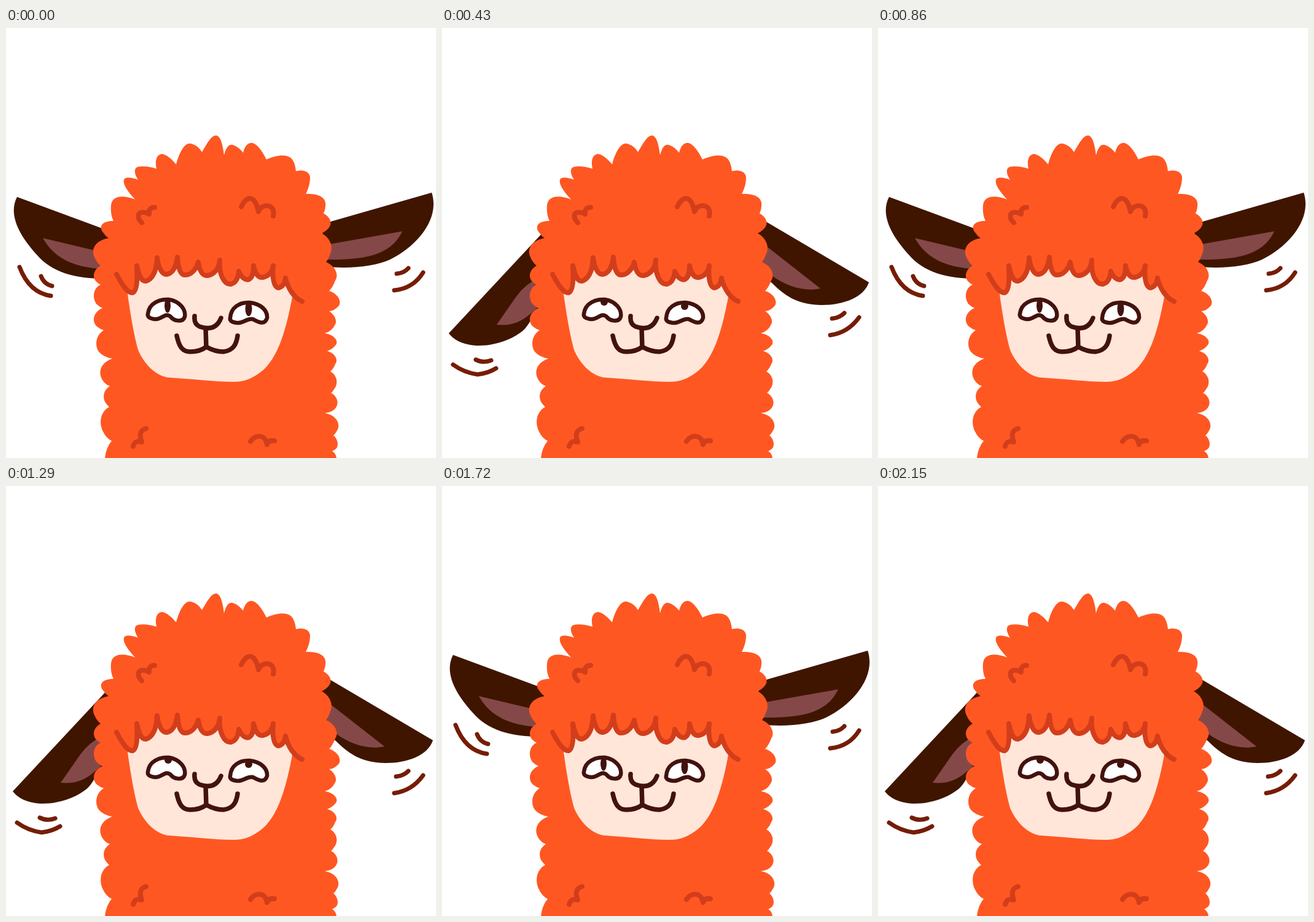
Recreate the animation shown at these times as an HTML page. Size 700 px wide and 700 px high, loop 2.58 s.

```html
<!DOCTYPE html>
<html lang="en">
<head>
<meta charset="utf-8">
<title>Alpaca flapping its ears</title>
<style>
  html, body { margin: 0; width: 100%; height: 100%; overflow: hidden; background: #fff; }
  svg { display: block; width: 100%; height: 100%; }
  .ear { fill: #401500; }
  .inner { fill: #854849; }
  .wool { fill: #ff5722; }
  .line { fill: none; stroke-linecap: round; stroke-linejoin: round; }
  .swish { stroke: #751d05; stroke-width: 7; }
  .curl { stroke: #d23e1b; stroke-width: 8; }
  .ink { stroke: #43120f; stroke-width: 7.5; }
  .eye { fill: #fff; stroke: #43120f; stroke-width: 6.5; stroke-linejoin: round; }
  .pupil { fill: #43120f; }
</style>
</head>
<body>
<svg viewBox="0 0 700 700">
  <g class="up">
    <path class="ear" d="M18 275L175 333V408H150C110 406 75 398 50 369C22 338 3 304 18 275Z
      M693 268L515 319V388C560 393 600 388 625 377C670 355 707 310 693 268Z"/>
    <path class="inner" d="M60 342L165 367V392H152C115 389 80 378 60 342Z
      M645 331L515 354V377H526C580 377 626 372 645 331Z"/>
    <path class="line swish" d="M22 389C30 410 45 432 73 436M57 404Q62 417 75 420
      M632 427Q663 424 679 398M636 400Q648 399 655 391"/>
  </g>
  <g class="down">
    <path class="ear" d="M11 497L180 316V445L153 460C145 475 138 490 126 497C95 519 35 528 11 497Z
      M695 414L500 299V385L537 415C562 440 582 450 618 451C655 451 687 438 695 414Z"/>
    <path class="inner" d="M89 483L121 437Q136 416 160 406V450C137 474 120 486 89 483Z
      M616 424L515 345V380L537 403C560 420 590 430 616 424Z"/>
    <path class="line swish" d="M18 548Q36 561 58 564Q75 562 88 554M55 540Q67 546 80 541
      M632 500Q661 496 679 471M635 473Q647 472 655 464"/>
  </g>

  <!-- Fleece: crown, left side, right side -->
  <path class="wool" d="M210 279C200 268 190 256 192 247C194 242 204 243 215 247
    C208 236 208 228 215 226C223 224 235 226 245 229C242 216 245 206 254 205
    C262 206 270 214 277 222C282 203 290 188 299 188C308 189 315 195 319 202
    C328 187 334 175 342 175C350 176 353 192 355 207C358 196 361 190 368 190
    C376 192 381 197 386 203C389 192 393 187 400 187C409 188 418 202 424 214
    C440 207 454 205 463 211C469 216 471 224 472 233C485 230 494 234 495 243
    C495 254 492 262 488 270L480 320H220Z"/>
  <path class="wool" d="M210 279C190 271 172 273 171 289C170 300 172 308 175 314
    C153 314 151 326 159 334Q162 339 167 342C144 346 138 362 144 373Q147 381 154 387
    C143 393 140 404 146 412Q150 416 154 418C142 423 140 439 147 449Q152 454 157 456
    C142 462 139 478 148 486Q153 490 159 492C146 500 144 517 151 527Q159 536 173 538
    C152 546 150 562 157 573Q161 580 169 583C158 590 157 602 162 610Q165 614 168 617
    C153 625 151 644 158 657Q163 668 172 672Q163 683 161 700H350V279Z"/>
  <path class="wool" d="M488 270C505 269 519 274 520 285Q521 293 517 302
    C527 307 531 316 527 323Q523 330 514 334C528 342 533 356 528 367Q525 376 521 381
    C537 388 542 402 536 411Q532 422 526 428C542 433 547 447 541 453Q535 460 526 461
    C533 465 541 476 535 484Q531 493 519 497C534 499 543 510 536 517Q531 523 523 526
    C537 530 541 541 536 547Q533 555 528 559C540 566 541 580 534 588Q532 592 529 594
    C540 600 542 611 537 618Q533 625 519 627C539 630 545 646 539 655Q536 661 533 663
    C542 671 541 682 537 685Q535 687 531 689Q537 692 538 700H340V270Z"/>

  <path fill="#ffe6d9" d="M197 425C200 450 208 500 215 524C225 548 245 567 265 569
    C300 571 340 576 370 576C390 576 400 570 412 562C445 540 458 480 466 438L460 380H200Z"/>
  <path id="fringe" class="wool" d="M180 401C190 420 198 431 206 431C214 428 214 405 213 387
    C217 405 221 413 228 412C240 408 245 395 246 374C248 390 254 402 262 401
    C272 399 277 388 279 373C280 390 284 403 292 402C302 402 310 392 313 381
    C315 395 320 404 328 403C340 401 347 390 348 378C346 400 355 418 366 417
    C374 415 378 407 379 396C384 408 391 411 396 409C402 405 403 397 403 387
    C406 400 411 407 418 406C428 404 434 396 435 387C433 405 436 423 444 423
    C451 421 454 415 455 407C459 425 470 440 482 445"/>
  <path id="fringeLine" class="line curl"/>
  <path class="line curl" d="M221 317C213 309 214 300 222 300Q229 300 233 303C232 295 236 292 242 292
    M383 291C390 275 405 268 411 299C415 285 440 285 435 306
    M207 681Q210 670 221 674Q214 656 228 652
    M398 673C405 662 422 660 425 678Q428 670 437 672"/>

  <path class="eye" d="M231 465C233 448 250 441 265 442C283 445 293 458 291 470
    C288 480 273 477 268 470C260 462 253 475 243 474C233 473 230 470 231 465Z
    M365 472C366 455 380 446 397 447C415 449 426 460 425 472
    C421 485 410 478 402 474C392 472 387 481 376 480C367 479 364 476 365 472Z"/>
  <g class="pupil up">
    <ellipse cx="263" cy="452" rx="5" ry="11.5"/>
    <ellipse cx="395" cy="457" rx="5.5" ry="12"/>
  </g>
  <g class="pupil down">
    <circle cx="264" cy="446" r="6"/>
    <circle cx="395" cy="453" r="6"/>
  </g>
  <path class="line ink" d="M307 469C306 478 309 483 315 486C335 493 345 485 350 472M325 489L326 520
    M278 501C282 520 288 527 300 527Q316 527 326 519Q340 527 354 527C370 525 375 515 377 501"/>
</svg>
<script>
  const POSE_MS = 430;
  const showAll = (selector, visible) => document.querySelectorAll(selector)
    .forEach(el => el.style.display = visible ? '' : 'none');

  // The fringe edge serves both as the outline stroke and as the wool above it.
  const fringe = document.getElementById('fringe');
  const edge = fringe.getAttribute('d');
  document.getElementById('fringeLine').setAttribute('d', edge);
  fringe.setAttribute('d', edge + 'V350H180Z');

  function draw(now) {
    const earsUp = Math.floor(now / POSE_MS) % 2 === 0;
    showAll('.up', earsUp);
    showAll('.down', !earsUp);
    requestAnimationFrame(draw);
  }
  draw(performance.now());
</script>
</body>
</html>
```
